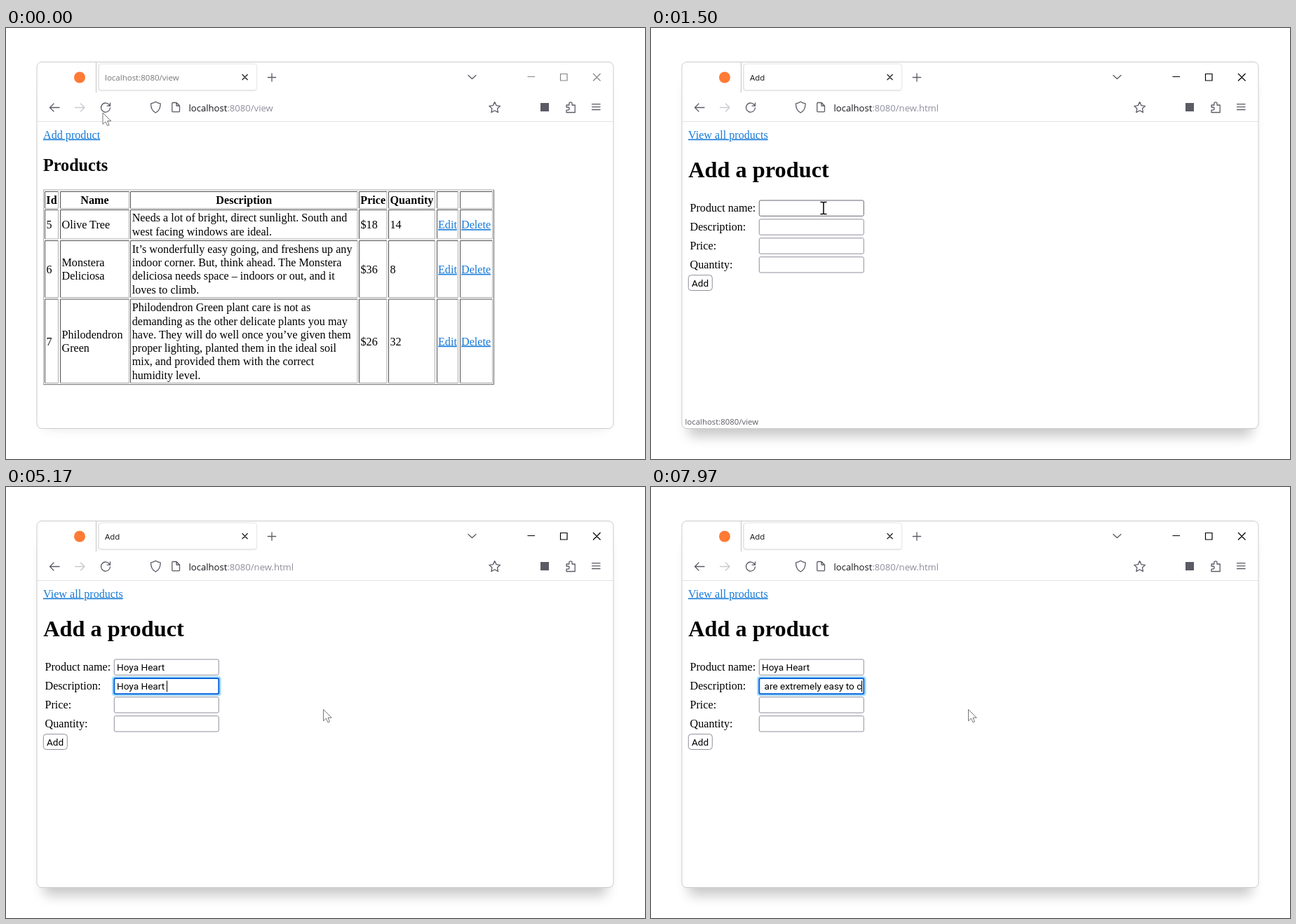
Animation of 911x615 px, one loop 8 s. Source, as an HTML page:

```html
<!DOCTYPE html>
<html lang="en">
<head>
<meta charset="utf-8">
<title>Add a product</title>
<style>
html, body { margin: 0; width: 100%; height: 100%; overflow: hidden; background: #fff; }
svg { display: block; }
text { white-space: pre; }
.page { font: 16.15px "Liberation Serif", serif; fill: #000; }
.bold { font-weight: bold; }
.h1 { font-size: 32.3px; font-weight: bold; }
.h2 { font-size: 24.2px; font-weight: bold; }
.link { fill: #187bd8; text-decoration: underline; }
.pressed { fill: #e8262b; }
.ui { font: 11.5px "Open Sans", sans-serif; }
.url { font-size: 13.1px; fill: #15141a; }
.dim { fill: #8f8f9d; }
.field { font: 13.6px Roboto, sans-serif; }
.icon { fill: none; stroke: #5b5b66; stroke-width: 1.3; stroke-linecap: round; stroke-linejoin: round; }
.box { fill: #fff; stroke: #8f8f9d; }
.box.hover { stroke: #676774; }
.box.focus { stroke: #0a66dc; stroke-width: 2; }
.halo { fill: #a9dcff; }
.cursor { fill: #fff; stroke: #666; stroke-width: .9; stroke-linejoin: round; }
</style>
</head>
<body>
<svg width="911" height="615" viewBox="0 0 911 615">
  <defs>
    <filter id="soft" x="-10%" y="-10%" width="120%" height="120%"><feGaussianBlur stdDeviation="8.5"/></filter>
    <filter id="thin" x="-10%" y="-20%" width="120%" height="140%"><feGaussianBlur stdDeviation="1"/></filter>
    <clipPath id="clip"><rect x="157.8" y="240" width="144.2" height="110"/></clipPath>
  </defs>

  <rect id="shadow" x="53" width="804" rx="8" filter="url(#soft)"/>
  <rect x="44" y="48.5" width="822" height="523" rx="7" fill="#fff" stroke="#cbcbcb"/>
  <path d="M44.5 133.5H865.5" stroke="#e2e2e4"/>
  <path d="M128.5 49V92" stroke="#c4c4c8"/>
  <rect x="132" y="51.5" width="225" height="37.5" rx="4" fill="#bbb" filter="url(#thin)"/>
  <rect x="132.5" y="51.5" width="224.5" height="37" rx="4" fill="#fff"/>
  <circle cx="105" cy="70.5" r="8" fill="#ff7a35"/>

  <text id="tab" class="ui" x="141" y="75"></text>
  <text class="ui url" x="260.5" y="118.5">localhost<tspan id="path" class="dim"></tspan></text>

  <g class="icon">
    <path d="M337 66.5l7.2 7.2m0-7.2l-7.2 7.2" stroke="#222"/>
    <path d="M373.3 70.5h11.4m-5.7-5.7v11.4M659 67.5l5.5 5 5.5-5"/>
    <path d="M76 113.5H62.5m5.5-5.5l-5.5 5.5 5.5 5.5"/>
    <path d="M98.5 113.5H112m-5.5-5.5l5.5 5.5-5.5 5.5" stroke="#c9c9cf"/>
    <path d="M147.6 110.2A6.5 6.5 0 1 0 148.5 114M148.5 107v4.2h-4.3"/>
    <path d="M213.3 105.3C211 107 208.5 107.6 206.5 107.8C206.5 114 208 118.5 213.3 121C218.6 118.5 220.2 114 220.2 107.8C218 107.6 215.6 107 213.3 105.3Z"/>
    <path d="M238 106.5h5l4.5 4.5v7.5q0 1.2-1.2 1.2h-8.3q-1.2 0-1.2-1.2v-10.8q0-1.2 1.2-1.2zM243 106.5v4.5h4.5"/>
    <path id="star"/>
    <rect x="762" y="107" width="12" height="12" fill="#5b5b66" stroke="none"/>
    <path d="M799 110h3.8v-2a2 2 0 0 1 4.2 0v2h4.2v10.5H799v-3.3h2a2 2 0 0 0 0-4.2h-2z"/>
    <path d="M835.5 108.7h11.5m-11.5 3.9h11.5m-11.5 3.9h11.5"/>
  </g>
  <path id="controls" fill="none" stroke-width="1.2" d="M743.5 69.5h10.5M790.5 65.5h9.5v9.5h-9.5zM837 65l10.5 10.5m0-10.5l-10.5 10.5"/>

  <g id="list" class="page"></g>
  <g id="form" class="page"></g>
  <text id="status" class="ui" x="48.5" y="565.5" fill="#5b5b66" style="font-size:11.4px"></text>

  <g id="pointer">
    <path id="arrow" class="cursor" d="M0 0V16.3L3.9 12.7L6.5 18.4L9 17.3L6.5 11.7H11.7Z"/>
    <path id="hand" class="cursor" d="M-1.9 12V2Q-1.9.4 0 .4T1.9 2V7.5Q2.4 6.7 3.6 7T5 8.6Q5.6 7.8 6.6 8.3T7.6 9.8Q9.3 9.2 9.3 11.2V14.5Q9.3 18 7 20.5H-1Q-3.5 17.8-6 13.8Q-7.2 11.5-5.4 11.1Q-4 11-1.9 13.6M1.9 7.5V11.5M5 8.6V11.8M7.6 9.8V12"/>
    <path id="beam" fill="none" stroke="#000" stroke-width="1.5" d="M-4.5-8.5H-1.3L0-7.6L1.3-8.5H4.5M0-7.6V7.6M-4.5 8.5H-1.3L0 7.6L1.3 8.5H4.5"/>
  </g>
</svg>
<script>
const $ = id => document.getElementById(id);
const show = (el, on) => el.setAttribute('visibility', on ? 'visible' : 'hidden');
const put = (el, attrs) => { for (const k in attrs) el.setAttribute(k, attrs[k]); };
const text = (x, y, s, cls = '', more = '') => `<text x="${x}" y="${y}" class="${cls}" ${more}>${s}</text>`;

// Bevelled frame: one colour for top and left, another for bottom and right
const bevel = (x0, y0, x1, y1, a, b) =>
  `<path fill="none" stroke="${a}" d="M${x0} ${y1}V${y0}H${x1}"/>` +
  `<path fill="none" stroke="${b}" d="M${x1} ${y0}V${y1}H${x0}"/>`;

const cols = [[55.5, 74.5], [77.5, 175.5], [177.5, 501], [503.5, 543], [545.5, 611.5], [614.5, 644.5], [647.5, 693.5]];
const textX = [57.5, 79.5, 179.7, 505.5, 547.5, 616, 649];
const rows = [
  { y: [233.5, 257.5], cells: ['Id', 'Name', 'Description', 'Price', 'Quantity', '', ''] },
  { y: [259.5, 301], cells: ['5', 'Olive Tree',
    'Needs a lot of bright, direct sunlight. South and|west facing windows are ideal.', '$18', '14', 'Edit', 'Delete'] },
  { y: [303.5, 384.5], cells: ['6', 'Monstera|Deliciosa',
    'It’s wonderfully easy going, and freshens up any|indoor corner. But, think ahead. The Monstera|deliciosa needs space – indoors or out, and it|loves to climb.',
    '$36', '8', 'Edit', 'Delete'] },
  { y: [387, 506.5], cells: ['7', 'Philodendron|Green',
    'Philodendron Green plant care is not as|demanding as the other delicate plants you may|have. They will do well once you’ve given them|proper lighting, planted them in the ideal soil|mix, and provided them with the correct|humidity level.',
    '$26', '32', 'Edit', 'Delete'] }
];

let html = text(53, 157.5, 'Add product', 'link', 'id="addLink"') + text(53, 204.3, 'Products', 'h2') +
  bevel(53.5, 231, 695.5, 508.7, '#a8a8a8', '#666');
rows.forEach(({ y: [y0, y1], cells }, r) => cells.forEach((cell, c) => {
  const [x0, x1] = cols[c], lines = cell.split('|');
  html += bevel(x0, y0, x1, y1, '#505050', '#acacac');
  lines.forEach((s, i) => {
    const y = (y0 + y1) / 2 + 5.8 + (i - (lines.length - 1) / 2) * 19.25;
    html += r ? text(textX[c], y, s, c > 4 ? 'link' : '')
              : text((x0 + x1) / 2, y, s, 'bold', 'text-anchor="middle"');
  });
}));
$('list').innerHTML = html;

html = text(53, 157.5, 'View all products', 'link') + text(53.3, 212.6, 'Add a product', 'h1');
['Product name:', 'Description:', 'Price:', 'Quantity:'].forEach((s, i) => {
  const y = 246 + i * 26.9;
  html += text(55.5, y + 16.4, s) +
    `<rect id="halo${i}" class="halo" x="151" y="${y - 3}" width="155.7" height="28.3" rx="4"/>` +
    `<rect id="box${i}" class="box" x="154.3" y="${y}" width="149" height="22.3" rx="2"/>` +
    `<g clip-path="url(#clip)">${text(158, y + 16.4, '', 'field', `id="value${i}"`)}</g>`;
});
$('form').innerHTML = html + '<path id="caret" stroke="#000"/>' +
  '<rect class="box" x="53.3" y="352.7" width="34" height="21.8" rx="4"/>' + text(58, 368.9, 'Add', 'field');

$('star').setAttribute('d', 'M' + Array.from({ length: 10 }, (_, i) => {
  const a = (i / 5 - .5) * Math.PI, r = i % 2 ? 4 : 8.2;
  return (696.7 + r * Math.cos(a)).toFixed(1) + ' ' + (113.8 + r * Math.sin(a)).toFixed(1);
}).join('L') + 'Z');

// Typing runs: first key time, last key time, keys
const typing = [
  [[2230, 2230, 'H'], [2400, 3100, 'oya Heart']],
  [[3930, 3930, 'H'], [4170, 4530, 'oya '], [4770, 4970, 'Heart'], [5170, 5170, ' '], [5270, 5900, 'plants '],
   [6000, 6170, 'are '], [6370, 6600, 'extre'], [6770, 6770, 'm'], [7000, 7000, 'e'],
   [7230, 7630, 'ly easy '], [7800, 7970, 'to c']]
];
const typed = (runs, t) => runs.map(([a, b, s]) =>
  t < a ? '' : s.slice(0, 1 + Math.floor((s.length - 1) * Math.min(1, (t - a) / (b - a || 1)) + 1e-6))).join('');

// Pointer moves: start, end, from, to
const moves = [
  [30, 620, [138, 121], [108, 153]],
  [1060, 1460, [108, 153], [246, 257]],
  [3330, 3570, [243.5, 297.5], [452.5, 317.5]]
];
const ease = u => u * u * (3 - 2 * u);
const easeOut = u => 1 - (1 - u) ** 2;
function pointerAt(t) {
  let pos = moves[0][2];
  moves.forEach(([a, b, p, q], i) => {
    if (t < a) return;
    const u = (i < 2 ? ease : easeOut)(Math.min(1, (t - a) / (b - a)));
    pos = p.map((v, k) => v + (q[k] - v) * u);
  });
  return pos;
}

const pen = document.createElement('canvas').getContext('2d');
pen.font = '13.6px Roboto, sans-serif';

function draw(t) {
  const active = t >= 700, onForm = t >= 940, [x, y] = pointerAt(t);
  const focus = t >= 3700 ? 1 : t >= 1900 ? 0 : -1;

  put($('shadow'), active ? { y: 78, height: 505, opacity: .21 } : { y: 74, height: 497, opacity: .1 });
  $('controls').setAttribute('stroke', active ? '#000' : '#858585');
  $('tab').setAttribute('fill', active ? '#15141a' : '#77777c');
  $('tab').textContent = onForm ? 'Add' : 'localhost:8080/view';
  $('path').textContent = onForm ? ':8080/new.html' : ':8080/view';
  $('list').style.display = onForm ? 'none' : '';
  $('form').style.display = onForm ? '' : 'none';
  $('addLink').setAttribute('class', active && t < 870 ? 'link pressed' : 'link');

  const onLink = x > 53 && x < (onForm ? 167 : 134) && y > 143 && y < 162;
  $('status').textContent = onForm ? (t < 1570 ? 'localhost:8080/view' : '') : onLink ? 'localhost:8080/new.html' : '';

  let overField = false;
  for (let i = 0; i < 4; i++) {
    const top = 246 + i * 26.9;
    const over = onForm && x > 154 && x < 304 && y > top && y < top + 22.5;
    overField = overField || over;
    $('halo' + i).style.display = i === focus ? '' : 'none';
    $('box' + i).setAttribute('class', 'box' + (i === focus ? ' focus' : over ? ' hover' : ''));
    const value = typing[i] ? typed(typing[i], t) : '';
    const width = pen.measureText(value).width, left = Math.min(158, 300.3 - width);
    $('value' + i).textContent = value;
    $('value' + i).setAttribute('x', left);
    if (i === focus) $('caret').setAttribute('d', `M${Math.floor(left + width) + .5} ${top + 3.5}v16`);
  }
  $('caret').style.display = focus < 0 ? 'none' : '';

  $('pointer').setAttribute('transform', `translate(${x} ${y})`);
  show($('hand'), onLink);
  show($('beam'), overField);
  show($('arrow'), !onLink && !overField);
}

const start = performance.now();
function tick() {
  draw((performance.now() - start) % 8000);
  requestAnimationFrame(tick);
}
draw(0);
requestAnimationFrame(tick);
</script>
</body>
</html>
```
